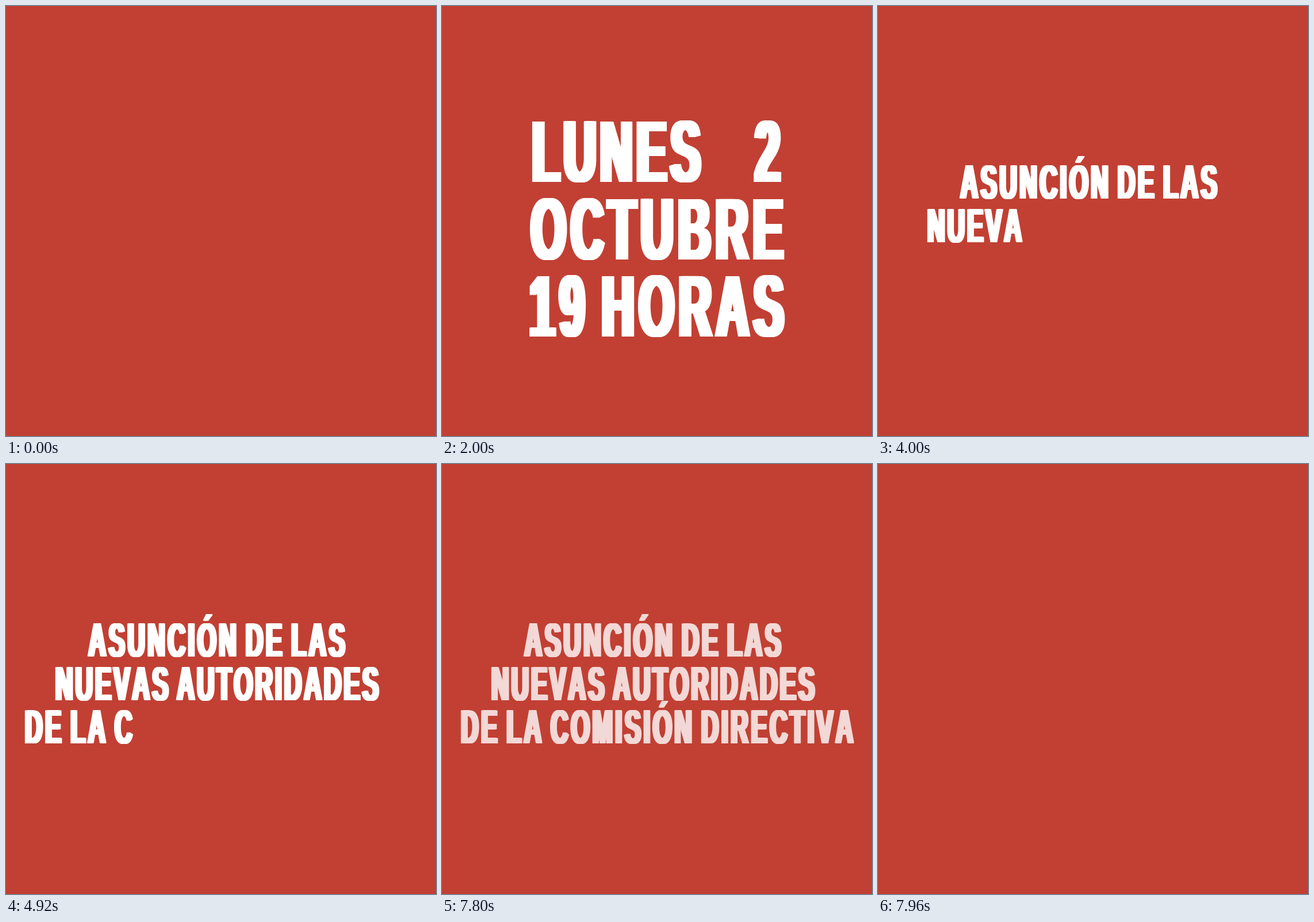
These frames come from a looping animation (748x748 px, 8 s). An HTML page with a canvas:

```html
<!DOCTYPE html>
<html lang="es">
<head>
<meta charset="utf-8">
<title>Asunción de las nuevas autoridades</title>
<style>
  html, body { margin: 0; width: 100%; height: 100%; overflow: hidden; background: #c14033; }
  canvas { display: block; }
</style>
</head>
<body>
<canvas id="stage" width="748" height="748"></canvas>
<script>
const canvas = document.getElementById('stage');
const ctx = canvas.getContext('2d');

const LOOP = 8000, TICK = 40;
const DATE_END = 3080;
const TYPE_START = 3142.8, TYPE_STEP = 42.4;
const FADE_START = 7760, FADE_TIME = 200;
const CONDENSE = 0.51; // one narrow cut shared by all text
const WORD_GAP = -0.06; // tighter spaces, relative to the font size

const dateStyle = { size: 152.6, bold: 5.2 };
const titleStyle = { size: 82.5, bold: 2.9 };

const dateWords = [
  { text: 'LUNES', x: 157, y: 306, gap: 7.2, from: 320 },
  { text: '2', x: 544.7, y: 306, gap: 0, from: 680 },
  { text: 'OCTUBRE', x: 155, y: 441, gap: 8.9, from: 1160 },
  { text: '19 HORAS', x: 152.5, y: 575, gap: 8.8, from: 1600 }
];

const titleLines = [
  { text: 'ASUNCIÓN DE LAS', x: 143.5, y: 335, gap: 4.7 },
  { text: 'NUEVAS AUTORIDADES', x: 86, y: 410.5, gap: 4.2 },
  { text: 'DE LA COMISIÓN DIRECTIVA', x: 33, y: 486, gap: 4.7 }
];

function drawText(text, { x, y, gap }, { size, bold }) {
  ctx.save();
  ctx.font = `bold ${size}px "Liberation Sans", Arial, sans-serif`;
  ctx.fontKerning = 'none';
  ctx.letterSpacing = `${gap / CONDENSE}px`;
  ctx.wordSpacing = `${WORD_GAP * size / CONDENSE}px`;
  ctx.fillStyle = '#fff';
  ctx.translate(x, y);
  ctx.scale(CONDENSE, 1);
  // Sideways copies thicken the stems without raising the letters.
  for (let side = -1; side <= 1; side += 0.25) {
    ctx.fillText(text, side * bold / CONDENSE, 0);
  }
  ctx.restore();
}

function drawDate(t) {
  for (const word of dateWords) {
    if (t >= word.from) drawText(word.text, word, dateStyle);
  }
}

function drawTitle(t) {
  let typed = Math.floor((t - TYPE_START) / TYPE_STEP) + 1;
  for (const line of titleLines) {
    if (typed <= 0) break;
    drawText(line.text.slice(0, typed), line, titleStyle);
    typed -= line.text.length + 1; // the line break takes one keystroke
  }
}

function render(now) {
  const t = Math.floor((now % LOOP) / TICK) * TICK;
  ctx.clearRect(0, 0, canvas.width, canvas.height);
  if (t < DATE_END) drawDate(t);
  else drawTitle(t);
  const fade = (t - FADE_START) / FADE_TIME;
  canvas.style.opacity = 1 - Math.min(1, Math.max(0, fade));
}

const start = performance.now();
function loop() {
  render(performance.now() - start);
  requestAnimationFrame(loop);
}
loop();
</script>
</body>
</html>
```
